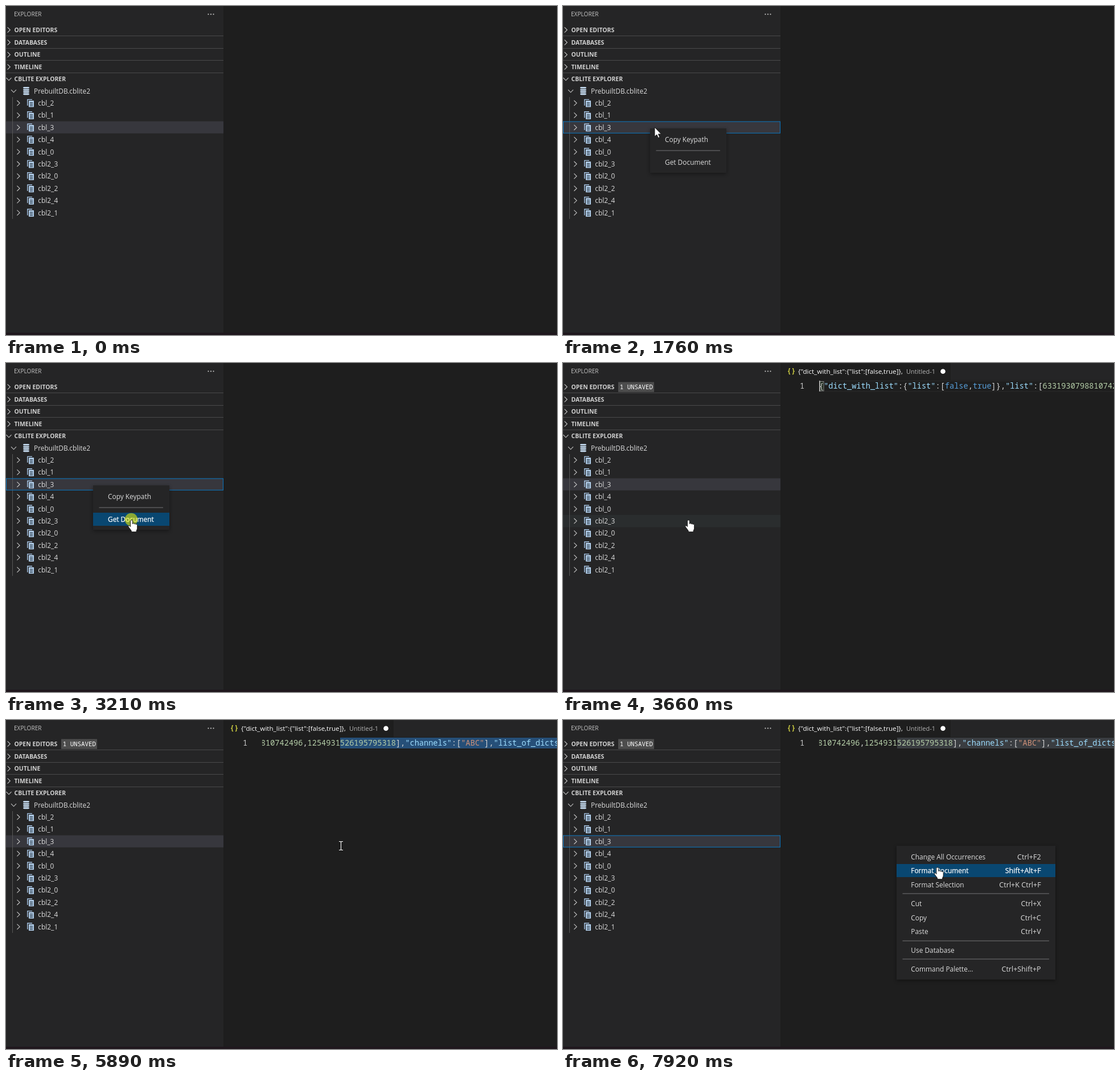
An HTML page that plays this animation: 968 px wide and 578 px high, repeating every 8000 ms.

```html
<!DOCTYPE html>
<html lang="en">
<head>
<meta charset="utf-8">
<title>Explorer</title>
<style>
html, body { margin: 0; width: 100%; height: 100%; overflow: hidden; background: #1e1e1e; }
svg { display: block; width: 100%; height: 100%; }
text { font: 11.9px "Open Sans", "Noto Sans", sans-serif; fill: #dcdcdc; }
.head { font-size: 10.45px; font-weight: 700; fill: #d0d0d0; }
.line { fill: none; stroke: #c5c5c5; stroke-width: 1.1; }
.sep { stroke: #757576; }
.key { font-size: 12.6px; text-anchor: end; }
.menu { fill: #252526; filter: drop-shadow(0 2px 3px rgba(0, 0, 0, .4)); }
.on { fill: #fff; stroke: #fff; stroke-width: .25; }
.code text { font: 13.63px "Noto Sans Mono", "DejaVu Sans Mono", monospace; }
.cursor { fill: #fff; stroke: #111; stroke-width: .9; stroke-linejoin: round; }
</style>
</head>
<body>
<svg id="stage" viewBox="0 0 968 578" xmlns="http://www.w3.org/2000/svg"></svg>
<script>
const LOOP = 8000, ROW = 21.4, ROWS_TOP = 138.6;

const rect = (x, y, w, h, fill, more = '') =>
  `<rect x="${x}" y="${y}" width="${w}" height="${h}" fill="${fill}" ${more}/>`;
const label = (x, mid, str, more = '', drop = 4.3) =>
  `<text x="${x}" y="${mid + drop}" ${more}>${str}</text>`;
const line = (d, more = 'class="line"') => `<path d="${d}" ${more}/>`;
const group = (id, body, more = '') => `<g id="${id}" ${more}>${body}</g>`;
const chevron = (x, y, open) =>
  line(open ? `M${x - 4.5} ${y - 2.3}l4.5 4.6 4.5-4.6` : `M${x - 2.4} ${y - 4.6}l4.7 4.6-4.7 4.6`);

function sidebar() {
  const heads = ['OPEN EDITORS', 'DATABASES', 'OUTLINE', 'TIMELINE', 'CBLITE EXPLORER'];
  const names = ['cbl_2', 'cbl_1', 'cbl_3', 'cbl_4', 'cbl_0', 'cbl2_3', 'cbl2_0', 'cbl2_2', 'cbl2_4', 'cbl2_1'];
  const mids = [42, 64, 85.5, 107, 128.5];
  let s = label(14, 14.5, 'EXPLORER', 'style="font-size:10.1px;fill:#c4c4c4"', 3.7);
  for (const x of [355.5, 360, 364.5]) s += `<circle cx="${x}" cy="14.5" r="1.1" fill="#ccc"/>`;
  heads.forEach((h, i) => {
    s += chevron(5, mids[i], i == 4) + label(14.5, mids[i], h, 'class="head"', 3.8);
    if (i) s += rect(0, Math.floor(mids[i] - 11.3), 382, 1, '#4a4a4b');
  });
  s += chevron(13.5, 149.5, true) + label(49, 149.3, 'PrebuiltDB.cblite2');
  for (let i = 0; i < 4; i++) s += rect(30, 142.2 + i * 3.7, 11, 2.9, '#c3d9ee', 'rx="2.2" ry="1.4"');
  s += rect(11, 160, 1, 214, '#585858');
  names.forEach((n, i) => {
    const y = 170.6 + i * ROW;
    s += chevron(21.8, y, false) + label(56.3, y, n) +
      line(`M37.8 ${y + 4.5}V${y - 6.2}H46`, 'fill="none" stroke="#a9c8e8" stroke-width="1.4"') +
      rect(40, y - 4.3, 9, 11.2, '#b5d2ef');
    for (const d of [-1.5, 1.2, 3.9]) s += rect(41.8, y + d, 5.4, 1.3, '#253340');
  });
  return s;
}

function colored(code) {
  return code.replace(/"[^"]*"(:?)|true|false|\d+|[^"\w]/g, (m, colon) => {
    const span = (c, v) => `<tspan fill="${c}">${v}</tspan>`;
    if (colon) return span('#9cdcfe', m.slice(0, -1)) + span('#d4d4d4', ':');
    return span(m[0] == '"' ? '#ce9178' : /\d/.test(m) ? '#b5cea8' : /\w/.test(m) ? '#569cd6' : '#d4d4d4', m);
  });
}

function editor() {
  const title = '{"dict_with_list":{"list":[false,true]},';
  const code = title + '"list":[6331930798810742496,1254931526195795318],"channels":["ABC"],"list_of_dicts":[{';
  return rect(681, 0, 287, 30, '#252526') +
    label(395, 14, '{ }', 'style="font-size:11.5px;font-weight:700;fill:#cbcb41"', 4) +
    label(413, 15, title, 'style="font-size:11.65px;fill:#fff"') +
    label(603, 15, 'Untitled-1', 'style="font-size:11.05px;fill:#b4b4b4"') +
    '<circle cx="667.5" cy="14.7" r="4.3" fill="#fff"/>' +
    group('page',
      rect(97, 33.5, 63, 17.5, '#4d4d4d') +
      label(99.7, 42.5, '1 UNSAVED', 'style="font-size:10.8px;fill:#fff"', 3.9) +
      group('current', rect(450.5, 31.5, 530, 18.5, 'none', 'stroke="#2a2a2a"') +
        rect(451.5, 32.5, 6.5, 16.5, '#1e2a1e', 'stroke="#888"')) +
      rect(587, 31, 381, 19, '#264f78', 'id="selection"') +
      label(416, 40.5, '1', 'style="fill:#c6c6c6"', 4.7) +
      `<g clip-path="url(#view)"><text id="code" x="450" y="45.2">${colored(code)}</text></g>` +
      rect(0, 31, 1.8, 19, '#aeafad', 'id="caret"'), 'class="code"');
}

const menus = [
  { id: 'menu0', x: 153, y: 215, w: 134, h: 78, pad: 26, seps: [254],
    items: [[235, 'Copy Keypath'], [274.5, 'Get Document']] },
  { id: 'menu1', x: 586, y: 221, w: 279, h: 235, pad: 25.3, seps: [305, 388, 420],
    items: [[241, 'Change All Occurrences', 'Ctrl+F2'], [265, 'Format Document', 'Shift+Alt+F'],
      [289.5, 'Format Selection', 'Ctrl+K Ctrl+F'], [323, 'Cut', 'Ctrl+X'], [347.5, 'Copy', 'Ctrl+C'],
      [372, 'Paste', 'Ctrl+V'], [404.5, 'Use Database'], [437.5, 'Command Palette...', 'Ctrl+Shift+P']] }
];

const drawMenu = m => group(m.id,
  rect(m.x, m.y, m.w, m.h, '#252526', 'class="menu"') +
  rect(m.x, 0, m.w, 23, '#094771', `id="${m.id}bar"`) +
  m.seps.map(y => line(`M${m.x + 10.5} ${y}H${m.x + m.w - 11}`, 'class="sep"')).join('') +
  m.items.map(([y, name, key], i) => `<g id="${m.id}item${i}">` + label(m.x + m.pad, y, name) +
    (key ? label(m.x + 253.7, y, key, 'class="key"') : '') + '</g>').join(''));

const $ = id => document.getElementById(id);
const show = (id, yes) => $(id).setAttribute('visibility', yes ? 'inherit' : 'hidden');
const put = (id, x, y) => $(id).setAttribute('transform', `translate(${x} ${y})`);

$('stage').innerHTML =
  '<clipPath id="view"><rect x="450" y="31" width="518" height="20"/></clipPath>' +
  rect(0, 0, 968, 578, '#1e1e1e') + rect(0, 0, 382, 578, '#252526') +
  rect(0, ROWS_TOP, 382, ROW, '#2a2d2e', 'id="hover"') +
  rect(0, 202.6, 382, 21.2, '#37373d') + sidebar() +
  rect(.5, 203.1, 381, 20.2, 'none', 'stroke="#0875c0" id="focus"') +
  group('editor', editor()) + rect(0, 574, 968, 4, '#1f171d') +
  group('tip', rect(162.5, 225.5, 44, 26, '#252526', 'stroke="#3c3c3d"') +
    label(170.5, 238.5, 'cbl_3', 'style="fill:#929292"')) +
  menus.map(drawMenu).join('') +
  group('pointer',
    '<circle id="click" r="11.3" fill-opacity=".53"/>' +
    line('M0 0V16.3L3.8 13l2.5 5.6 2.5-1.1L6.4 12h5.1z', 'id="arrow" class="cursor"') +
    line('M-1.4 2.8c0-2.4 3.8-2.4 3.8 0v5c.2-1.7 3-1.6 3 .4.3-1.5 2.8-1.3 2.8.6.4-1.2 2.5-.9 2.5 1.1V15c0 2.2-1.2 3-1.6 5v1.7H.3V20C-1 17.2-3.4 15.5-4.9 12.8c-1-2 1.4-3 3.5-.3z', 'id="hand" class="cursor"') +
    line('M-3.5-7.5h2.5l1 1 1-1h2.5M-3.5 7.5h2.5l1-1 1 1h2.5M0-6.5v13', 'id="beam" fill="none" stroke="#fff" stroke-width="1.1"'));

// start, end, steps, target x, target y
const moves = [
  [200, 1000, 12, 152, 213], [1630, 1760, 2, 161, 213], [1860, 2400, 7, 219, 258],
  [2500, 2790, 4, 220, 275], [3950, 4230, 4, 587, 216], [4370, 4370, 1, 596, 216],
  [4660, 4810, 3, 588.5, 221], [7340, 7920, 7, 657.5, 258]
];

function pointerAt(t) {
  let x = 528, y = 411;
  for (const [from, to, n, tx, ty] of moves) {
    if (t < from) break;
    const done = Math.floor((t - from) / (to - from) * (n - 1) + 1e-6 || 0) + 1;
    const u = Math.min(1, done / n), e = u ** 3 * (10 - 15 * u + 6 * u * u);
    x += (tx - x) * e;
    y += (ty - y) * e;
  }
  return [x, y];
}

function draw(t) {
  const during = (a, b = LOOP) => t >= a && t < b;
  const [x, y] = pointerAt(t);
  const open = [during(1470, 3370), during(6950)];
  const anyMenu = open[0] || open[1];
  let shape = 'arrow';

  const row = Math.floor((y - ROWS_TOP) / ROW);
  const onRow = t >= 200 && !anyMenu && x < 382 && row >= 0 && row < 11;
  show('hover', onRow);
  $('hover').setAttribute('y', ROWS_TOP + row * ROW);
  if (onRow) shape = 'hand';
  else if (!anyMenu && x >= 382 && during(3510)) shape = 'beam';

  menus.forEach((m, k) => {
    const hit = open[k] ? m.items.findIndex(([mid]) => Math.abs(y - mid) < 12) : -1;
    show(m.id, open[k]);
    show(m.id + 'bar', hit >= 0);
    m.items.forEach((_, i) => {
      for (const el of $(m.id + 'item' + i).children) el.classList.toggle('on', i == hit);
    });
    if (hit >= 0) {
      $(m.id + 'bar').setAttribute('y', Math.round(m.items[hit][0] - 12));
      shape = 'hand';
    }
  });

  show('focus', during(1400, 3510) || during(6950));
  show('tip', during(1270, 1400));
  show('editor', during(3510));
  const page = during(3580), scrolled = during(5300), selected = during(5370);
  show('page', page);
  show('current', page && !scrolled);
  show('selection', selected);
  $('selection').setAttribute('fill', during(6890) ? '#3a3d41' : '#264f78');
  put('code', scrolled ? -476.5 : 0, 0);
  show('caret', during(3580, 4230) || during(4740, 5300) || during(5370, 5890) || during(6660, 6890));
  put('caret', scrolled ? 585.3 : 450, 0);

  const right = during(1270, 1330) || during(6890, 6950);
  show('click', right || during(3210, 3370) || during(5300, 5370));
  $('click').setAttribute('fill', right ? '#f00' : '#ff0');
  show('pointer', t >= 200);
  put('pointer', x, y);
  for (const s of ['arrow', 'hand', 'beam']) show(s, s == shape && t >= 200);
}

const began = performance.now();
function tick() {
  draw((performance.now() - began) % LOOP);
  requestAnimationFrame(tick);
}
tick();
</script>
</body>
</html>
```
